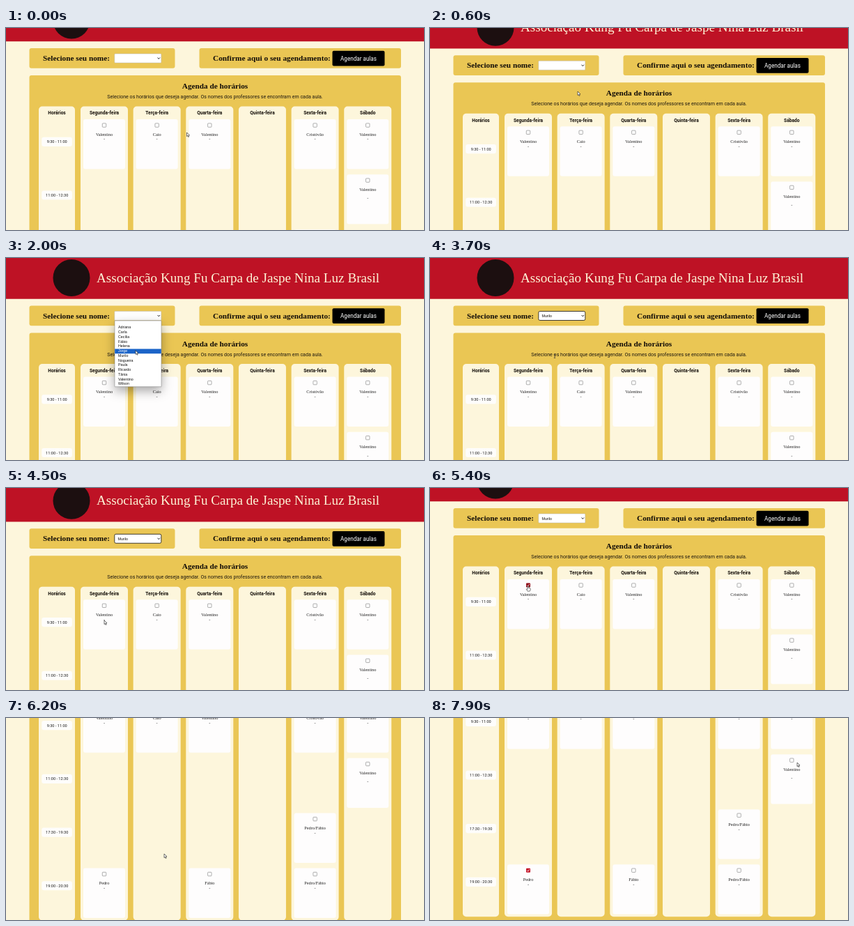
Write an HTML page with a canvas that moves like this. It is 600 px wide and 290 px high and loops after 8 s.

```html
<!DOCTYPE html>
<html lang="pt-BR">
<head>
<meta charset="utf-8">
<title>Agenda de horários</title>
<style>
html, body { margin: 0; width: 100%; height: 100%; overflow: hidden; background: #fdf6dc; }
canvas { display: block; width: 600px; height: 290px; }
</style>
</head>
<body>
<canvas id="stage"></canvas>
<script>
const canvas = document.getElementById('stage');
const ctx = canvas.getContext('2d');
const dpr = window.devicePixelRatio || 1;
canvas.width = 600 * dpr;
canvas.height = 290 * dpr;

const LOOP = 8000, STEP = 100;
const NOTCH = 39.5;
const CREAM = '#fdf6dc', GOLD = '#eac654', RED = '#be1225', INK = '#120d08';
const SERIF = '"Liberation Serif", serif';
const SANS = '"Liberation Sans", sans-serif';
const ROBOTO = 'Roboto, sans-serif';
const OPEN_AT = 1600, PICK_AT = 2400;

const days = ['Segunda-feira', 'Terça-feira', 'Quarta-feira', 'Quinta-feira', 'Sexta-feira', 'Sábado'];
const hours = ['9:30 - 11:00', '11:00 - 12:30', '17:30 - 19:30', '19:00 - 20:30'];
const teachers = [
  ['Valentino', 'Caio', 'Valentino', '', 'Cristóvão', 'Valentino'],
  ['', '', '', '', '', 'Valentino'],
  ['', '', '', '', 'Pedro/Fábio', ''],
  ['Pedro', '', 'Fábio', '', 'Pedro/Fábio', ''],
];
const students = ['Adriana', 'Carla', 'Cecília', 'Fábio', 'Helena', 'Jorge', 'Murilo',
  'Nogueira', 'Paula', 'Ricardo', 'Tânia', 'Valentino', 'Wilson'];
const mondayChecks = { 0: 5300, 3: 7000 };

const columnX = day => 107 + day * 75.65;
const checkbox = (day, row) => ({ x: columnX(day) + 34, y: 179.1 + row * 79.05 });
const itemY = i => 99.6 + i * 6.75;

function ease(t, from, to) {
  const p = Math.min(1, Math.max(0, (t - from) / (to - from)));
  return p * p * (3 - 2 * p);
}

function scrollAt(t) {
  return NOTCH * (1 - ease(t, 500, 800) + ease(t, 4400, 4700)
    + 3 * ease(t, 5600, 6000) + ease(t, 6100, 6230));
}

function pointerAt(t) {
  const p = { x: 259.5, y: 150 };
  const move = (from, to, x, y) => {
    const k = ease(t, from, to);
    p.x += (x - p.x) * k;
    p.y += (y - p.y) * k;
  };
  const first = checkbox(0, 0), last = checkbox(0, 3);
  move(0, 600, 212, 91);
  move(900, 1300, 190, 84);
  move(OPEN_AT, 2000, 186, itemY(5) - 0.6);
  move(2900, 3200, 228, 130);
  move(3300, 3500, 155, 165);
  move(3600, 3700, 179, 141);
  move(3700, 4300, first.x, 190);
  move(4700, 5100, first.x, first.y - NOTCH + 1.5);
  move(5600, 6000, 227, 195);
  move(6200, 6400, last.x, last.y - 5 * NOTCH + 1.5);
  move(7100, 7600, 400, 255);
  move(7400, 7900, 527, 64);
  return p;
}

function box(x, y, w, h, r, fill, stroke, line = 0.6) {
  ctx.beginPath();
  ctx.roundRect(x, y, w, h, r);
  if (fill) { ctx.fillStyle = fill; ctx.fill(); }
  if (stroke) { ctx.strokeStyle = stroke; ctx.lineWidth = line; ctx.stroke(); }
}

function text(str, x, y, font, color = INK, align = 'left') {
  ctx.font = font;
  ctx.fillStyle = color;
  ctx.textAlign = align;
  ctx.fillText(str, x, y);
}

function draw(path, color, width, fill) {
  const shape = new Path2D(path);
  if (fill) { ctx.fillStyle = fill; ctx.fill(shape); }
  ctx.strokeStyle = color;
  ctx.lineWidth = width;
  ctx.stroke(shape);
}

function header() {
  box(0, 0, 600, 58.8, 0, RED);
  box(67.5, 2, 53, 53, 26.5, '#1c0f10');
  text('Associação Kung Fu Carpa de Jaspe Nina Luz Brasil', 130, 34.5, '19.15px ' + SERIF, '#fdf3d6');
}

function toolbar(t) {
  const label = 'bold 11.3px ' + SERIF;
  box(33.5, 68.5, 209, 28.7, 3, GOLD);
  box(277.5, 68.5, 289.5, 28.7, 3, GOLD);
  text('Selecione seu nome:', 53, 86.5, label);
  text('Confirme aqui o seu agendamento:', 297, 86.5, label);

  const focused = t >= PICK_AT && t < mondayChecks[0];
  box(155.8, 76.5, 67, 13, focused ? 2 : 1, '#fff', focused ? '#111' : '#bbb', focused ? 0.8 : 0.5);
  draw('M217.6 82l1.7 1.9 1.7-1.9', '#111', 0.9);
  if (t >= PICK_AT) text('Murilo', 160.5, 85, '5.3px ' + SANS);

  box(468.5, 72.3, 75, 21.8, 2, '#000');
  text('Agendar aulas', 506, 86, '8.15px ' + ROBOTO, '#fff', 'center');
}

function lesson(name, day, row, t, hovered) {
  const { x, y } = checkbox(day, row);
  box(x - 30, y - 8.5, 60, 71.4, 3, '#fefdfd');
  if (day === 0 && t >= mondayChecks[row]) {
    box(x - 3, y - 3, 6, 6, 1, hovered ? '#8f0b18' : '#c41228');
    draw(`M${x - 1.8} ${y + 0.1}l1.3 1.3 2.4-2.9`, '#fff', 0.9);
  } else {
    box(x - 2.7, y - 2.7, 5.4, 5.4, 0.8, '#fff', '#777');
  }
  const font = '6.3px ' + SERIF;
  text(name, x, y + 15.3, font, '#222', 'center');
  text('-', x, y + (row === 1 ? 27.5 : 21.8), font, '#222', 'center');
}

function schedule(t, isHovered) {
  box(33.5, 107.5, 533.5, 400, 3, GOLD);
  text('Agenda de horários', 300, 126.5, 'bold 11.25px ' + SERIF, INK, 'center');
  text('Selecione os horários que deseja agendar. Os nomes dos professores se encontram em cada aula.',
    300, 140.7, '7.08px ' + ROBOTO, '#1d1810', 'center');

  const column = (label, x, w) => {
    box(x, 152, w, 330.7, 5, CREAM);
    text(label, x + w / 2, 163.8, 'bold 6.6px ' + ROBOTO, INK, 'center');
  };
  column('Horários', 47, 52);
  days.forEach((day, i) => column(day, columnX(i), 68));
  hours.forEach((hour, i) => {
    const y = 202.8 + i * 76.7;
    box(51.3, y - 6.6, 43.6, 13.2, 3, '#fefdfb');
    text(hour, 73.2, y + 2, '5.6px ' + ROBOTO, '#1a1a1a', 'center');
  });
  teachers.forEach((names, row) => names.forEach((name, day) => {
    if (name) lesson(name, day, row, t, isHovered(day, row));
  }));
}

function dropdown(pointerY) {
  const hover = Math.max(-1, Math.round((pointerY - itemY(0)) / 6.75));
  ctx.save();
  ctx.shadowColor = 'rgba(0,0,0,.35)';
  ctx.shadowBlur = 16 * dpr;
  ctx.shadowOffsetY = 6 * dpr;
  box(156, 90, 67, 94.8, 0.5, '#fff');
  ctx.restore();
  box(156, 90, 67, 94.8, 0.5, null, '#777', 0.5);
  box(156.2, itemY(hover) - 2.9, 66.6, 6.7, 0, '#1b64c8');
  students.forEach((name, i) =>
    text(name, 161, itemY(i) + 1.7, '5.3px ' + SANS, i === hover ? '#fff' : '#111'));
}

function pointer({ x, y }, kind) {
  ctx.save();
  ctx.translate(x, y);
  if (kind === 'hand') {
    draw('M-.8 0H.6L.8 2.4 3 3l.2 2-.9 2H-1L-2.8 4.2-2 3.6l1.2.8z', '#222', 0.6, '#fff');
  } else if (kind === 'beam') {
    draw('M-1.2-2.5h2.4M0-2.5v5M-1.2 2.5h2.4', '#333', 0.65);
  } else {
    draw('M0 0v5.6l1.3-1.1.9 2 .9-.4-.8-2L4 4z', '#222', 0.65, '#fff');
  }
  ctx.restore();
}

function render(now) {
  const t = Math.floor((now % LOOP) / STEP) * STEP;
  const scroll = scrollAt(t), mouse = pointerAt(t);
  const open = t >= OPEN_AT && t < PICK_AT;
  const isHovered = (day, row) => {
    const c = checkbox(day, row);
    return Math.hypot(mouse.x - c.x, mouse.y + scroll - c.y) < 4;
  };
  const overText = !open && Math.abs(mouse.y + scroll - 140) < 3 && mouse.x > 145 && mouse.x < 455;
  const overCheck = isHovered(0, 0) || isHovered(0, 3);

  ctx.setTransform(dpr, 0, 0, dpr, 0, 0);
  box(0, 0, 600, 290, 0, CREAM);
  ctx.save();
  ctx.translate(0, -scroll);
  header();
  toolbar(t);
  schedule(t, isHovered);
  ctx.restore();
  if (open) dropdown(mouse.y);
  pointer(mouse, overCheck ? 'hand' : overText ? 'beam' : 'arrow');
}

let start;
function tick(now) {
  start ??= now;
  render(now - start);
  requestAnimationFrame(tick);
}
render(0);
requestAnimationFrame(tick);
</script>
</body>
</html>
```
